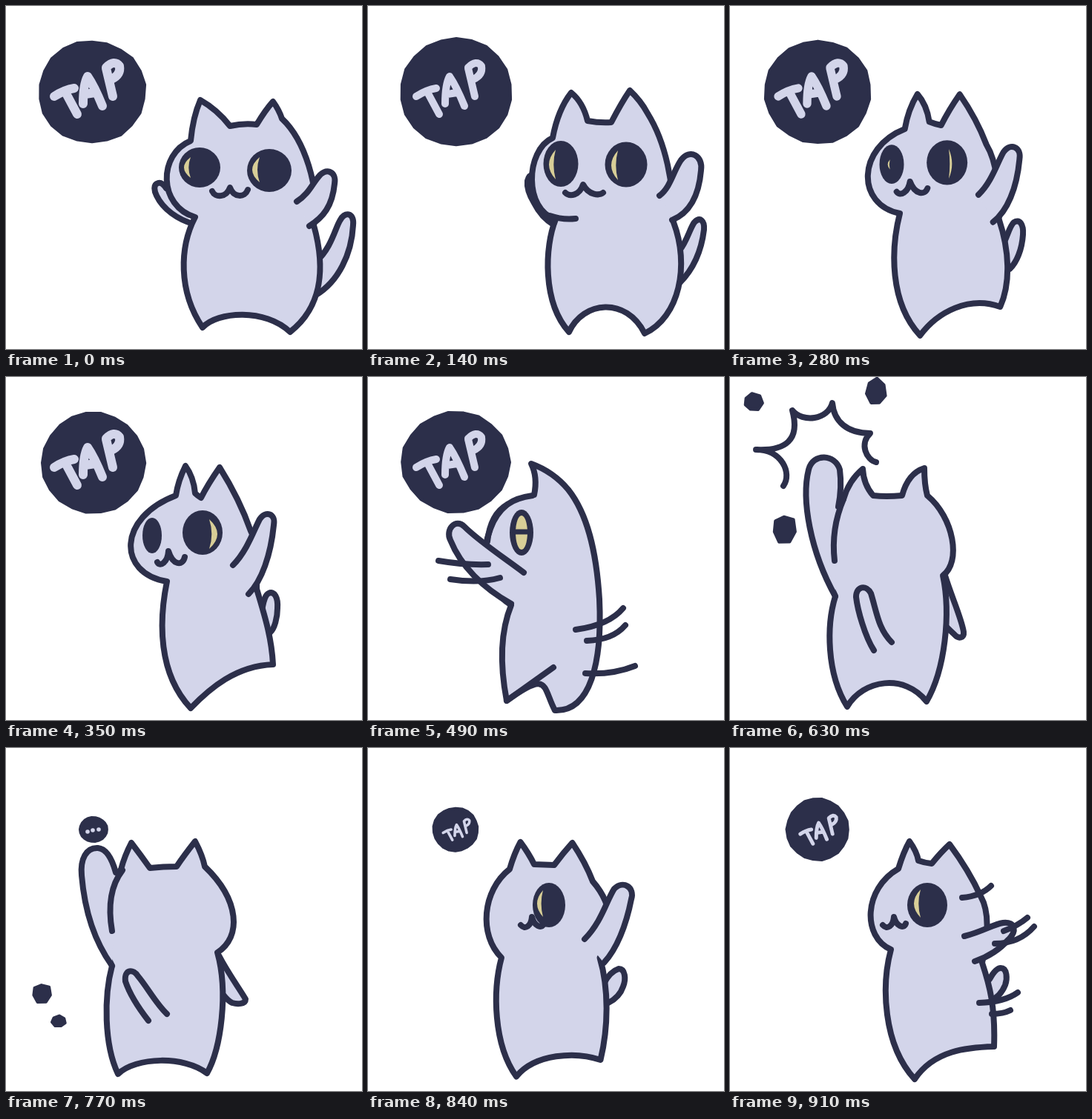
These frames come from a looping animation (480 px wide and 463 px high, 0.98 s). An HTML page:

```html
<!DOCTYPE html>
<html lang="en">
<head>
<meta charset="utf-8">
<title>Tap cat</title>
<style>
  html, body { margin: 0; width: 100%; height: 100%; overflow: hidden; background: #fff; }
  svg { display: block; width: 100vw; height: 100vh; }
</style>
</head>
<body>
<svg id="stage" viewBox="0 0 480 463" fill="none" stroke-linecap="round" stroke-linejoin="round"></svg>
<script>
const INK = '#2c2f4a', FUR = '#d3d5ea', GLOW = '#d8ce97';
const STEP = 70, COUNT = 14;
const stage = document.getElementById('stage');

// Curve commands for each part; poses below hold only the coordinates.
const SHAPE = { body: 'MCCCCQQQQQC', arm: 'MCCC', far: 'MCCC', tail: 'MCCC', backTail: 'MCCC', mouth: 'MCC', cheek: 'MQ' };
const ARGS = { M: 2, Q: 4, C: 6 };

// Eyes: cx cy rx ry, then glow x y width half-height. Ball: cx cy rx ry, letter weight.
const wave = {
  body: '255 285 234 325 232 385 265 434 285 412 350 408 383 440 428 405 430 350 415 296 424 245 402 180 372 152 368 140 360 129 350 140 338 160 320 158 302 162 285 140 262 127 252 150 249 182 205 200 205 270 255 285',
  arm: '392 264 408 254 413 240 421 231 430 218 446 222 443 240 440 270 428 285 409 297',
  far: '216 246 212 240 208 238 205 239 198 241 200 250 203 256 212 275 232 288 252 294',
  tail: '418 345 438 328 444 300 450 290 456 277 470 278 468 296 466 335 448 372 418 390',
  eyeL: '261 218 28 27 249 218 9 14',
  eyeR: '355 222 30 29 342 221 10 17',
  mouth: '278 250 282 259 297 259 302 245 307 259 322 259 326 248',
  ball: '116 116 73 70 12'
};
const lean = {
  body: '253 288 238 325 235 400 271 440 290 398 348 392 373 442 420 420 434 350 412 292 412 240 402 185 377 145 368 128 353 114 342 130 328 157 312 158 296 155 290 130 274 117 256 140 249 178 212 195 210 275 253 288',
  arm: '393 256 408 245 412 222 422 208 434 192 452 202 449 222 446 258 432 280 410 289',
  far: '222 228 218 228 216 232 215 236 214 244 218 256 224 266 231 280 240 289 250 295',
  tail: '420 330 430 318 434 300 440 292 448 284 454 290 453 302 449 335 436 358 420 374',
  eyeL: '260 213 23.5 31 253 214 9 20',
  eyeR: '348 214 28.5 30.5 337 215 9 20',
  mouth: '266 252 272 258 285 256 290 241 298 256 312 256 317 252',
  ball: '119 116 76 74 10',
  lines: 'M245 283Q262 289 280 287'
};
const turn = {
  body: '217 276 206 330 205 400 249 447 275 420 310 390 360 388 358 350 348 320 338 286 338 255 340 225 330 208 315 165 288 122 272 145 263 163 258 160 255 157 253 135 242 120 232 140 229 160 150 190 150 265 217 276',
  arm: '306 254 325 235 335 205 342 192 350 180 364 184 361 200 357 240 345 275 327 293',
  tail: '346 310 348 300 350 294 354 292 362 288 367 298 366 312 366 325 362 340 356 345',
  eyeL: '197 214 13 24 197 214 0 0',
  eyeR: '265 210 27 30 274 212 -11 20',
  mouth: '204 250 208 257 218 250 219 235 225 254 238 256 241 243',
  ball: '118 116 71 69 12'
};
const swipe = {
  body: '193 308 178 345 178 390 187 437 245 395 235 418 252 450 300 452 316 385 312 300 308 235 296 185 270 152 250 128 220 117 229 135 224 159 223 159 222 160 200 163 188 172 172 185 165 205 155 230 150 280 193 308',
  arm: '210 264 185 245 150 222 130 202 118 190 104 206 111 220 125 255 155 285 193 306',
  eyeR: '207 210 16 31 207 210 0 0',
  cheek: '161 222 165 185 188 172',
  ball: '118.5 115 74 69 10',
  slit: '207 210',
  lines: 'M187 437L250 392M95 248Q130 254 162 253M111 273Q150 279 178 271M280 341Q325 335 344 312M295 356Q330 355 347 335M293 400Q330 402 360 390'
};
const smash = {
  body: '142 296 130 335 130 400 158 445 180 408 235 400 265 438 290 395 298 320 287 268 312 250 302 190 266 160 262 145 262 123 240 130 232 160 210 162 193 160 180 145 179 124 160 140 153 165 128 195 120 250 142 296',
  arm: '146 175 150 155 150 140 148 125 142 104 112 102 106 125 96 165 108 235 142 296',
  far: '290 268 298 295 312 325 315 344 316 353 308 353 304 349 300 345 294 340 290 335',
  backTail: '194 369 182 350 172 315 170 297 170 282 184 280 190 292 198 318 200 340 218 358',
  cheek: '141 248 136 205 153 165',
  lines: 'M72 147C84 130 70 98 35 98C75 100 95 85 84 45C98 62 132 58 138 35C140 60 158 76 189 76C174 90 184 112 197 115'
};
const rest = {
  body: '143 294 132 335 132 400 151 440 175 417 240 415 271 439 290 405 300 330 285 276 318 255 315 205 268 160 265 145 255 126 240 145 230 160 212 160 194 162 182 145 169 128 160 145 155 164 128 195 120 250 143 294',
  arm: '148 168 143 150 136 136 124 135 108 134 100 150 102 172 106 220 120 262 143 294',
  far: '287 280 300 305 315 325 323 339 323 346 312 346 305 344 300 342 296 337 292 332',
  backTail: '192 368 178 350 166 330 161 315 159 298 172 298 178 308 190 322 202 345 217 359',
  cheek: '143 247 134 195 157 165',
  ball: '118 110 20 18 9'
};
const back = {
  body: '217 272 204 320 206 400 249 447 275 408 320 404 356 403 358 350 350 320 340 290 346 260 352 225 338 200 322 165 296 130 285 140 272 156 262 155 254 152 252 140 242 126 234 140 227 163 180 190 178 255 217 272',
  arm: '316 254 340 248 355 238 368 236 386 234 386 248 376 258 362 274 345 283 330 288',
  tail: '350 312 355 303 360 297 365 297 374 297 374 312 371 320 366 332 360 336 354 340',
  eyeR: '266 212 27 30 257 210 9 19',
  mouth: '206 239 212 246 220 240 221 228 224 240 234 245 237 237',
  ball: '118 110 43 43 9',
  lines: 'M313 202Q338 200 352 186M369 247Q388 240 401 229M357 264Q390 264 410 241M336 344Q370 343 388 330M353 359Q368 359 378 354'
};

const keys = [[0, wave], [2, lean], [5, turn], [7, swipe], [9, smash], [11, rest], [13, back]];
// Fast swings that do not follow the straight blend.
const swings = {
  6: { arm: '266 262 264 235 260 205 257 188 256 166 231 166 230 188 222 225 226 270 240 296',
       eyeR: '212 212 17 30 212 212 0 0' },
  8: { ball: '118 115 72 69 10' },
  12: { arm: '292 258 315 235 322 205 332 190 344 178 360 188 355 204 348 240 335 272 318 290',
        tail: '318 318 324 306 332 300 338 298 347 298 348 312 344 322 340 334 332 340 324 344',
        eyeR: '244 212 22 30 236 210 8 18' }
};

const nums = s => s.split(' ').map(Number);
const mix = (a, b, t) => a + (b - a) * t;

function poseAt(i) {
  const k = keys.findLastIndex(e => e[0] <= i);
  const [start, a] = keys[k];
  if (start === i) {
    return Object.fromEntries(Object.entries(a).map(([n, v]) => [n, n === 'lines' ? v : nums(v)]));
  }
  const [end, b] = keys[k + 1], t = (i - start) / (end - start), pose = {};
  for (const name of new Set([...Object.keys(a), ...Object.keys(b)])) {
    if (name === 'lines' || name === 'slit') continue;
    if (a[name] && b[name]) {
      const to = nums(b[name]);
      pose[name] = nums(a[name]).map((v, j) => mix(v, to[j], t));
    } else {
      const near = (t < .5 ? a : b)[name];
      if (near) pose[name] = nums(near);
    }
  }
  if (i === 10) delete pose.ball;
  for (const name in swings[i]) pose[name] = nums(swings[i][name]);
  return pose;
}

function curve(cmds, v) {
  let at = 0;
  return [...cmds].map(c => c + v.slice(at, at += ARGS[c]).map(n => n.toFixed(1)).join(' ')).join('');
}
const path = (d, fill, width = 8, ink = INK) =>
  `<path d="${d}" fill="${fill}" stroke="${ink}" stroke-width="${width}"/>`;
const oval = (x, y, rx, ry, fill) =>
  `<ellipse cx="${x}" cy="${y}" rx="${rx}" ry="${ry}" fill="${fill}"/>`;

function part(pose, name, fill = FUR) {
  if (!pose[name]) return '';
  return path(curve(SHAPE[name], pose[name]) + (name === 'body' ? 'Z' : ''), fill);
}

function blob(x, y, rx, ry, seed, n, rough) {
  let d = '';
  for (let i = 0; i < n; i++) {
    const r = 1 + rough * Math.sin(seed * 7.3 + i * i * 2.1 + i);
    const a = i / n * Math.PI * 2 + seed;
    d += (i ? 'L' : 'M') + (x + rx * r * Math.cos(a)).toFixed(1) + ' ' + (y + ry * r * Math.sin(a)).toFixed(1);
  }
  return path(d + 'Z', INK, 4);
}

function eye(v) {
  if (!v) return '';
  const [x, y, rx, ry, gx, gy, w, h] = v;
  let out = oval(x, y, rx, ry, INK);
  if (w) out += `<path fill="${GLOW}" d="M${gx} ${gy - h}Q${gx - 2 * w} ${gy} ${gx} ${gy + h}Q${gx - .6 * w} ${gy} ${gx} ${gy - h}Z"/>`;
  return out;
}

function slitEye([x, y]) {
  return oval(x, y, 8, 23, GLOW) + path(`M${x - 9} ${y - 1}h18`, 'none', 7);
}

const letters = 'M65 122Q79 113 92 111M81 118L96 146' +
  'M104 132Q104 106 110 95Q119 108 130 135M107 119L120 117' +
  'M135 83Q146 72 153 81Q155 93 142 99M135 84L144 122';

function ball(v, i) {
  if (!v) return '';
  const [x, y, rx, ry, weight] = v;
  let out = blob(x, y, rx - 2, ry - 2, i + 1, 22, .012);
  if (rx < 25) return out + [[-8, 3], [-1, 1], [7, 0]].map(p => oval(x + p[0], y + p[1], 2.8, 2.8, FUR)).join('');
  const s = .55 * rx / 43;
  const move = rx < 60 ? `translate(${x + 1} ${y}) scale(${s}) translate(-109 -111)` : '';
  return out + `<g transform="${move}">${path(letters, 'none', weight, FUR)}</g>`;
}

// Fragments: start x y rx ry, end x y rx ry.
const bits = [
  [31, 34, 12, 11, 48, 331, 12, 12],
  [73, 205, 15, 18, 71, 369, 9, 7],
  [197, 20, 13, 17, 215, 520, 9, 9]
];
function debris(i) {
  if (i < 9 || i > 11) return '';
  const t = (i - 9) / 2;
  return bits.map((b, n) => {
    const [x, y, rx, ry] = b.slice(0, 4).map((v, j) => mix(v, b[j + 4], j === 1 ? t * t : t));
    return blob(x, y, rx, ry, n + 1 + t, 7, .1);
  }).join('');
}

function draw(i) {
  const p = poseAt(i);
  stage.innerHTML = ball(p.ball, i) + debris(i) +
    part(p, 'tail') + part(p, 'far') + part(p, 'body') + part(p, 'backTail') +
    eye(p.eyeL) + eye(p.eyeR) + (p.slit ? slitEye(p.slit) : '') +
    part(p, 'mouth', 'none') + part(p, 'arm') + part(p, 'cheek', 'none') +
    (p.lines ? path(p.lines, 'none') : '');
}

let shown = -1;
const began = performance.now();
function tick() {
  const i = Math.floor((performance.now() - began) / STEP) % COUNT;
  if (i !== shown) draw(shown = i);
  requestAnimationFrame(tick);
}
tick();
</script>
</body>
</html>
```
